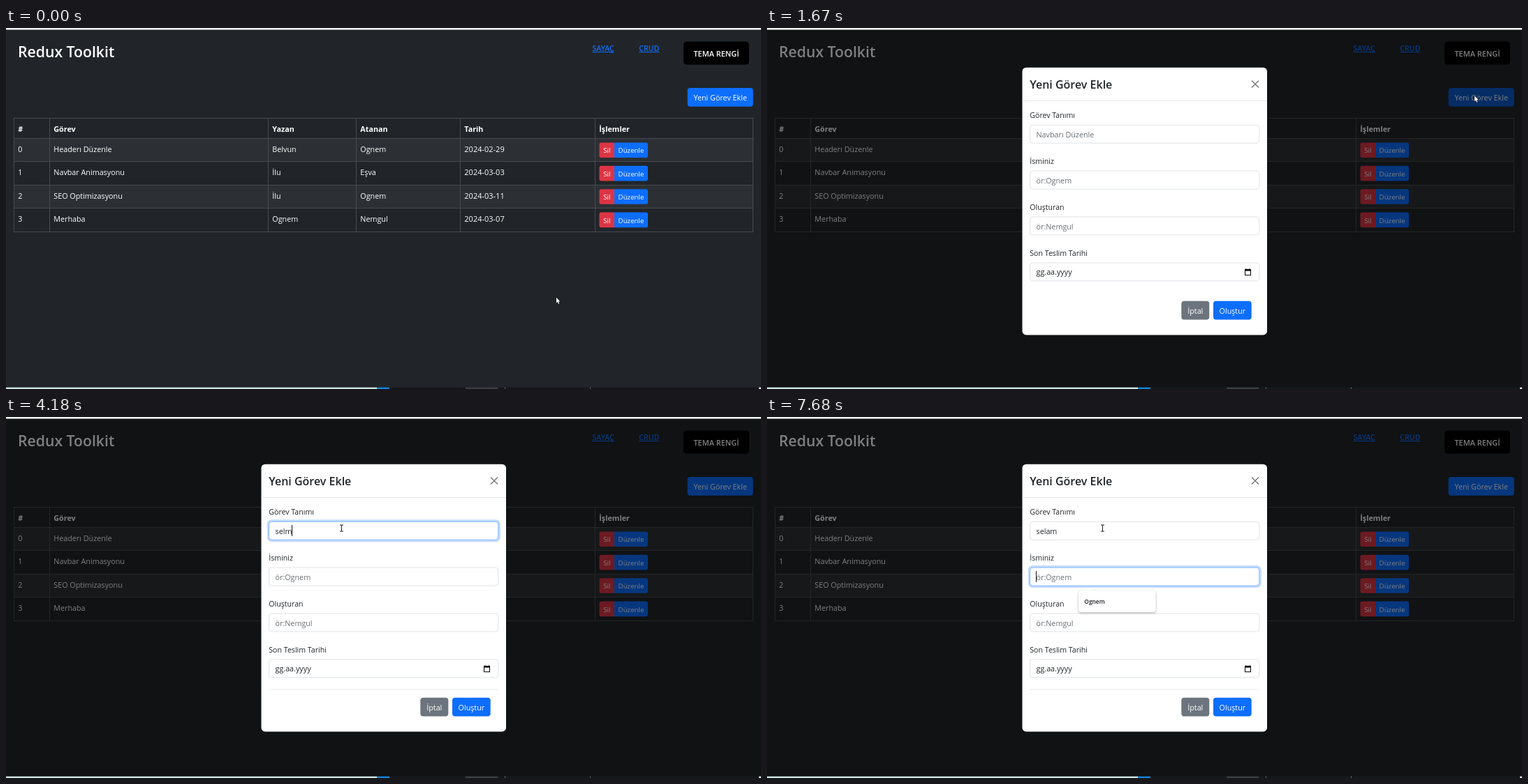
Write an HTML page with a canvas that moves like this. It is 1081 by 518 pixels and loops after 8 s.

```html
<!DOCTYPE html>
<html lang="tr">
<head>
<meta charset="utf-8">
<title>Redux Toolkit</title>
<style>
  html, body { margin: 0; width: 100%; height: 100%; overflow: hidden; background: #212529; }
  canvas { display: block; }
</style>
</head>
<body>
<canvas id="stage" width="1081" height="518"></canvas>
<script>
const ctx = document.getElementById('stage').getContext('2d');
const LOOP = 8000, TICK = 167;
const BLUE = '#0d6efd', RED = '#dc3545', GREY = '#6c757d', INK = '#212529', LINE = '#dee2e6';
const TABLE_LINE = '#474b4f';
const BODY = 10.75;

const COLUMNS = [11, 62, 375, 501, 650, 843, 1069];
const ROW_LINES = [129, 158, 191, 225, 258, 292];
const HEADINGS = ['#', 'Görev', 'Yazan', 'Atanan', 'Tarih', 'İşlemler'];
const TASKS = [
  ['0', 'Headerı Düzenle', 'Belvun', 'Ognem', '2024-02-29'],
  ['1', 'Navbar Animasyonu', 'İlu', 'Eşva', '2024-03-03'],
  ['2', 'SEO Optimizasyonu', 'İlu', 'Ognem', '2024-03-11'],
  ['3', 'Merhaba', 'Ognem', 'Nemgul', '2024-03-07'],
];
const FIELDS = [
  ['Görev Tanımı', 'Navbarı Düzenle'],
  ['İsminiz', 'ör:Ognem'],
  ['Oluşturan', 'ör:Nemgul'],
  ['Son Teslim Tarihi', 'gg.aa.yyyy'],
];

// [first tick, value] lists; the latest entry reached is current
const TYPED = [[0, ''], [21, 's'], [22, 'se'], [23, 'sel'], [24, 'selm'], [28, 'sel'], [31, 'sela'], [32, 'selam']];
const CARET = [[0, false], [15, true], [19, false], [21, true], [35, false], [38, true], [42, false], [44, true]];
const RING = [[0, -1], [16, 0], [45, 1]];
const MODAL_SHIFT = [[0, -50], [10, -11], [11, 0]];
const at = (track, tick) => track.filter(([from]) => from <= tick).pop()[1];

const mix = (a, b, k) => a + (b - a) * k;
const ease = (tick, from, to) => {
  const k = Math.min(1, Math.max(0, (tick - from) / (to - from)));
  return k * k * (3 - 2 * k);
};

function rect(x, y, w, h, color) {
  ctx.fillStyle = color;
  ctx.fillRect(x, y, w, h);
}

function box(x, y, w, h, radius, fill, stroke, width = 1) {
  ctx.beginPath();
  ctx.roundRect(x, y, w, h, radius);
  if (fill) { ctx.fillStyle = fill; ctx.fill(); }
  if (stroke) { ctx.strokeStyle = stroke; ctx.lineWidth = width; ctx.stroke(); }
}

// y is the middle of the capitals; the baseline sits on a whole pixel
function text(str, x, y, { size = BODY, weight = 400, color = '#fff', align = 'left' } = {}) {
  ctx.font = `${weight} ${size}px "Open Sans", "Noto Sans", sans-serif`;
  ctx.textAlign = align;
  ctx.fillStyle = color;
  ctx.fillText(str, x, Math.round(y + size * 0.36));
  return ctx.measureText(str).width;
}

function button(label, x, y, w, h, color, options = {}) {
  box(x, y, w, h, options.radius ?? 4, color);
  text(label, x + w / 2, y + h / 2 + 0.8, { ...options, align: 'center' });
}

function link(label, x, y) {
  const width = text(label, x, y, { size: 10.6, weight: 600, color: BLUE });
  rect(x, y + 5, width, 1, BLUE);
}

function drawPage(tick) {
  rect(0, 0, 1081, 518, INK);
  text('Redux Toolkit', 17, 34.3, { size: 21.2, weight: 600 });
  link('SAYAÇ', 839.5, 29);
  link('CRUD', 906.3, 29);
  button('TEMA RENGİ', 970, 19.5, 94, 33, '#000', { size: 10.9, weight: 600, radius: 4.5 });
  const hovered = tick >= 6 && tick < 11;
  const color = !hovered ? BLUE : tick < 9 ? '#0b5ed7' : '#0a58ca';
  button('Yeni Görev Ekle', 975.7, 86, 94, 26.7, color);
  drawTable();
}

function drawTable() {
  const left = COLUMNS[0], width = COLUMNS[6] - left + 1;
  for (const row of [1, 3]) rect(left, ROW_LINES[row], width, ROW_LINES[row + 1] - ROW_LINES[row], '#2c3034');
  for (const y of ROW_LINES) rect(left, y, width, 1, TABLE_LINE);
  for (const x of COLUMNS) rect(x, 129, 1, 164, TABLE_LINE);

  HEADINGS.forEach((label, i) => text(label, COLUMNS[i] + 6.3, 145, { weight: 700 }));
  TASKS.forEach((task, row) => {
    const y = 173.9 + row * 33.4;
    task.forEach((cell, i) => text(cell, COLUMNS[i] + 6.3, y, { size: i === 4 ? 11 : BODY }));
    button('Sil', 849.5, y - 9.5, 21.7, 21.6, RED, { size: 9.7, radius: [2.8, 0, 0, 2.8] });
    button('Düzenle', 871, y - 9.5, 48, 21.6, BLUE, { size: 9.7, radius: [0, 2.8, 2.8, 0] });
  });
}

function drawScreenEdges() {
  rect(0, 0, 1081, 2.5, '#f1f8f6');
  rect(0, 515.7, 1081, 2.3, '#15181b');
  rect(0, 515.7, 531, 2.3, '#cfe6e3');
  rect(531, 515.7, 18, 2.3, '#1683d8');
  rect(658, 515.7, 46, 2.3, '#3c3f42');
  rect(1078, 515.7, 3, 2.3, '#dfe8e6');
  for (const x of [714, 836]) rect(x, 515.7, 1, 2, '#777');
}

function drawCalendarIcon(x, y) {
  ctx.strokeStyle = '#000';
  ctx.lineWidth = 1;
  ctx.strokeRect(x + 0.5, y + 1.5, 8, 8);
  rect(x, y + 1, 9, 2.4, '#000');
  rect(x + 1.5, y, 1, 1, '#000');
  rect(x + 6.5, y, 1, 1, '#000');
}

function drawField(index, tick) {
  const [label, hint] = FIELDS[index];
  const y = 150 + index * 65.9;
  const focused = at(RING, tick) === index;
  const value = index === 0 ? at(TYPED, tick) : '';
  const isDate = index === 3;

  text(label, 376.3, y - 13.8, { size: 10.6, color: INK });
  if (focused) box(373.8, y - 2.8, 334, 32, 6.5, '#c2dbfe');
  box(376.5, y + 0.2, 328.3, 26, 4, '#fff', focused ? '#86b7fe' : LINE);
  const width = text(value || hint, 385.5, y + 13.9, { color: value || isDate ? INK : '#6b6f73' });
  if (isDate) drawCalendarIcon(684, y + 8.5);

  const owner = tick >= 44 ? 1 : 0;
  if (index === owner && at(CARET, tick)) rect(Math.round(385 + (value ? width : 0)), y + 5, 1, 16, '#111');
}

function drawSuggestion() {
  ctx.save();
  ctx.shadowColor = 'rgba(0,0,0,.35)';
  ctx.shadowBlur = 3;
  ctx.shadowOffsetY = 1;
  box(446, 249, 110.7, 31.3, 4, '#fff');
  ctx.restore();
  ctx.beginPath();
  ctx.moveTo(456, 249.5);
  ctx.lineTo(461, 244.5);
  ctx.lineTo(466, 249.5);
  ctx.fill();
  text('Ognem', 454.3, 264.5, { size: 8.4, weight: 600, color: '#202124' });
}

function drawModal(tick) {
  rect(0, 2.5, 1081, 513.2, 'rgba(0,0,0,.5)');
  ctx.save();
  ctx.translate(0, at(MODAL_SHIFT, tick));
  box(365.5, 67.7, 350.5, 383.8, 5.6, '#fff');
  text('Yeni Görev Ekle', 376.3, 92.3, { size: 16, weight: 600, color: INK });
  ctx.strokeStyle = '#777';
  ctx.lineWidth = 1.4;
  ctx.beginPath();
  for (const side of [-5, 5]) {
    ctx.moveTo(699 - side, 86.5);
    ctx.lineTo(699 + side, 96.5);
  }
  ctx.stroke();
  rect(365.5, 115, 350.5, 1, '#e3e6e9');

  FIELDS.forEach((_, i) => drawField(i, tick));
  if (tick > 10) rect(376, 390.5, 329, 1, '#e3e6e9');
  button('İptal', 593.3, 402.7, 40, 26.7, GREY);
  button('Oluştur', 639, 402.7, 54.7, 26.7, BLUE);
  if (tick >= 46) drawSuggestion();
  ctx.restore();
}

function drawArrow(x, y) {
  const outline = [[0, 0], [0, 8], [1.8, 6.4], [3.1, 9.4], [4.4, 8.8], [3.2, 5.9], [5.6, 5.7]];
  ctx.beginPath();
  for (const [dx, dy] of outline) ctx.lineTo(x + dx, y + dy);
  ctx.closePath();
  ctx.strokeStyle = '#000';
  ctx.lineWidth = 1;
  ctx.stroke();
  ctx.fillStyle = '#fff';
  ctx.fill();
}

function drawTextCursor(x, y) {
  rect(x - 0.5, y - 4.5, 1, 9, '#222');
  rect(x - 2.5, y - 5, 5, 1, '#222');
  rect(x - 2.5, y + 4, 5, 1, '#222');
}

function drawPointer(tick) {
  const toButton = ease(tick, 0, 7), toField = ease(tick, 10, 15);
  const x = mix(mix(787.9, 1013, toButton), 480.5, toField);
  const y = mix(mix(386.7, 97.3, toButton), 159.5, toField);
  if (tick >= 14) drawTextCursor(x, y);
  else drawArrow(x, y);
}

function render(now) {
  const tick = Math.floor(((now % LOOP) + 5) / TICK);
  drawPage(tick);
  if (tick >= 10) drawModal(tick);
  drawScreenEdges();
  drawPointer(tick);
}

let start;
function loop(now) {
  start ??= now;
  render(Math.max(0, now - start));
  requestAnimationFrame(loop);
}
requestAnimationFrame(loop);
</script>
</body>
</html>
```
